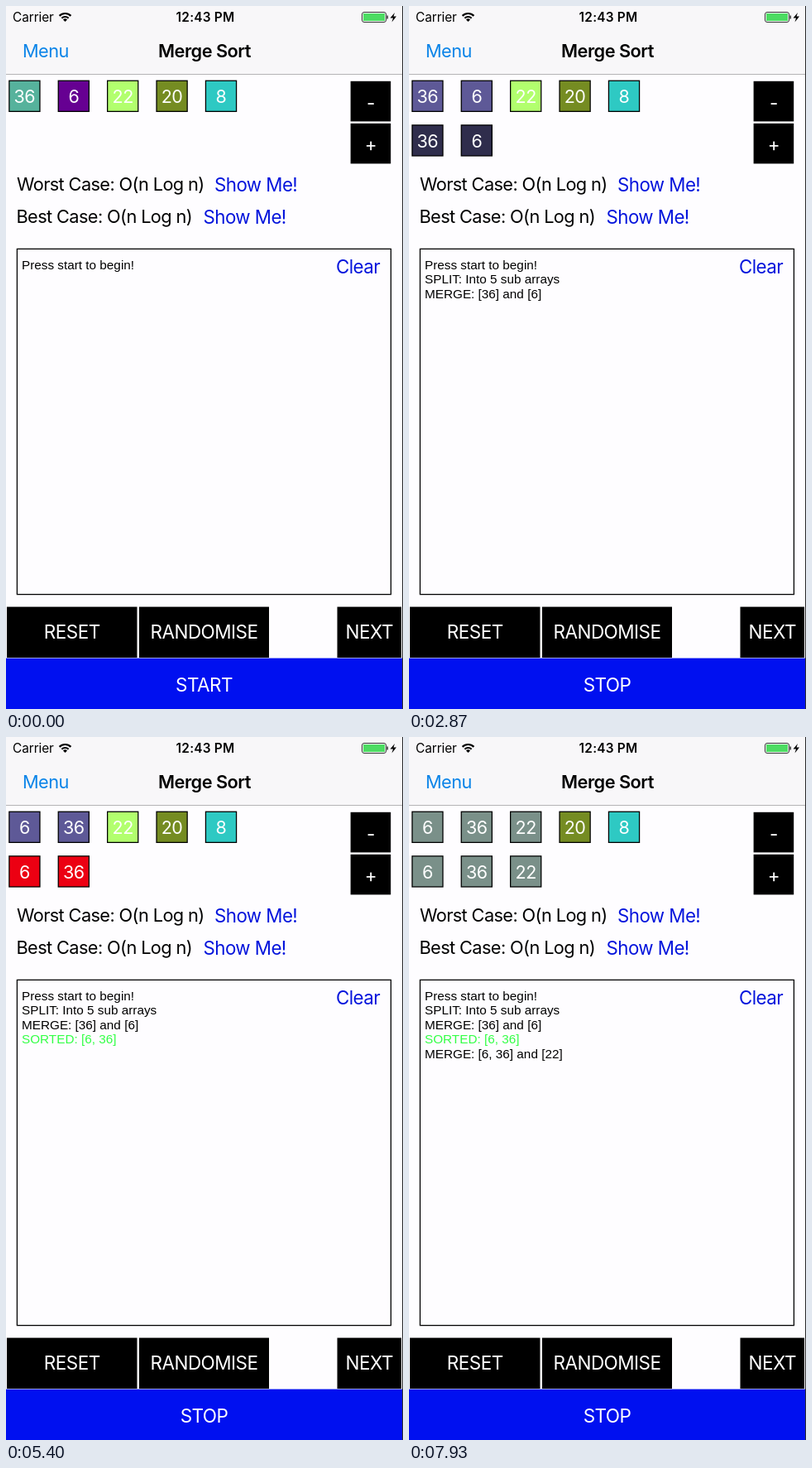
An HTML page with a canvas for the animation above (8000 ms loop, 480x849 px).

```html
<!DOCTYPE html>
<html lang="en">
<head>
<meta charset="utf-8">
<title>Merge Sort</title>
<style>
html, body { margin: 0; width: 100%; height: 100%; overflow: hidden; background: #fefdff; }
canvas { display: block; }
</style>
</head>
<body>
<canvas id="stage" width="480" height="849"></canvas>
<script>
const ctx = document.getElementById('stage').getContext('2d');
const LOOP = 8000, FADE = 300;
const UI = 'Inter, "Open Sans", sans-serif';
const LOG = '"Liberation Sans", Arial, sans-serif';
const BLUE = '#0010f0';
const LINK = { size: 22.3, color: '#0414dc' };
const LABEL = { track: -0.028 };

// Moments of the algorithm, in ms
const T = { start: 700, tint1: 1700, copy1: 2720, pick1: 3650, pick2: 4650,
            next: 5700, tint2: 6680, copy2: 7630 };

const BLACK = [0, 0, 0], RED = [236, 0, 18];
const COLORS = [[86, 178, 156], [102, 0, 146], [178, 255, 110], [117, 140, 34], [46, 201, 195]];
const mean = list => BLACK.map((_, i) => list.reduce((sum, c) => sum + c[i], 0) / list.length);
const PAIR = mean(COLORS.slice(0, 2));
const TRIPLE = mean(COLORS.slice(0, 3));

const LINES = [
  [0, 'Press start to begin!'],
  [T.start, 'SPLIT: Into 5 sub arrays'],
  [T.start, 'MERGE: [36] and [6]'],
  [T.pick2, 'SORTED: [6, 36]', '#33ff46'],
  [T.next, 'MERGE: [6, 36] and [22]']
];

function fade(from, to, t, at) {
  const p = Math.min(1, Math.max(0, (t - at) / FADE));
  const k = p * p * (3 - 2 * p);
  return from.map((v, i) => v + (to[i] - v) * k);
}

function rect(x, y, w, h, fill) {
  ctx.fillStyle = fill;
  ctx.fillRect(x, y, w, h);
}

function text(str, x, y, { size = 21.76, color = '#000', align = 'left', weight = 400, track = -0.024, family = UI } = {}) {
  ctx.font = `${weight} ${size}px ${family}`;
  ctx.letterSpacing = `${track * size}px`;
  ctx.textAlign = align;
  ctx.fillStyle = color;
  ctx.fillText(str, x, y);
}

function button(label, x, y, w, h, { fill = '#000', drop = 8 } = {}) {
  rect(x, y, w, h, fill);
  text(label, x + w / 2, y + h / 2 + drop, { size: 22.5, color: '#fff', align: 'center' });
}

function tile(value, col, row, color) {
  const x = 3.2 + col * 59.4, y = 89.6 + row * 53.6;
  rect(x, y, 38.4, 38.4, '#000');
  rect(x + 1.28, y + 1.28, 35.84, 35.84, `rgb(${color.map(Math.round)})`);
  text(value, x + 19.2, y + 27.4, { size: 21.5, color: '#fff', align: 'center' });
}

function statusBar() {
  text('Carrier', 8, 19, { size: 15.36, track: -0.005 });
  text('12:43 PM', 241, 19, { size: 15.36, weight: 600, align: 'center', track: 0.015 });

  ctx.strokeStyle = '#000';
  ctx.lineWidth = 2.2;
  for (const r of [5.8, 9.8]) {
    ctx.beginPath();
    ctx.arc(71.5, 18.8, r, -Math.PI * 0.75, -Math.PI * 0.25);
    ctx.stroke();
  }
  ctx.fillStyle = '#000';
  ctx.beginPath();
  ctx.moveTo(71.5, 19);
  ctx.arc(71.5, 19, 3.5, -Math.PI * 0.75, -Math.PI * 0.25);
  ctx.fill();

  ctx.lineWidth = 1;
  ctx.strokeStyle = '#333';
  ctx.beginPath();
  ctx.roundRect(430.5, 7.5, 29, 12, 2.5);
  ctx.stroke();
  rect(432, 9, 26, 9, '#4cdc62');
  rect(460.5, 11.5, 1.5, 4, '#333');

  ctx.fillStyle = '#000';
  ctx.beginPath();
  [[470, 8], [464.5, 14.5], [468, 14.5], [466.5, 19.5], [472, 12.5], [468.5, 12.5]]
    .forEach(([x, y]) => ctx.lineTo(x, y));
  ctx.fill();
}

function tiles(t) {
  const values = [t < T.pick1 ? 36 : 6, t < T.pick2 ? 6 : 36, 22, 20, 8];
  values.forEach((value, i) => {
    let color = COLORS[i];
    if (i < 2) color = fade(color, PAIR, t, T.tint1);
    if (i < 3) color = fade(color, TRIPLE, t, T.tint2);
    tile(value, i, 0, color);
  });

  if (t >= T.copy1 && t < T.next) {
    const base = fade(BLACK, PAIR, t, T.copy1);
    tile(t < T.pick2 ? 36 : 6, 0, 1, fade(base, RED, t, T.pick2));
    tile(t < T.pick1 ? 6 : 36, 1, 1, fade(base, RED, t, T.pick1));
  }
  if (t >= T.copy2) {
    [6, 36, 22].forEach((value, i) => tile(value, i, 1, fade(BLACK, TRIPLE, t, T.copy2)));
  }
}

function draw(t) {
  rect(0, 0, 480, 849, '#fefdff');
  rect(0, 0, 480, 82, '#f8f7f9');
  rect(0, 82, 480, 1, '#b4b3b5');
  statusBar();
  text('Menu', 20, 62, { color: '#0a84e8' });
  text('Merge Sort', 240, 62, { weight: 600, align: 'center' });

  tiles(t);
  button('-', 416.6, 90.8, 48.6, 48.6, { drop: 9.5 });
  button('+', 416.6, 141.8, 48.6, 48.6, { drop: 8.5 });

  text('Worst Case: O(n Log n)', 13, 223, LABEL);
  text('Show Me!', 252, 224, LINK);
  text('Best Case: O(n Log n)', 12.5, 262, LABEL);
  text('Show Me!', 238.5, 263, LINK);

  ctx.strokeStyle = '#000';
  ctx.lineWidth = 1.28;
  ctx.strokeRect(13.4, 293.4, 452, 417.2);
  LINES.forEach(([at, line, color], i) => {
    if (t >= at) text(line, 19, 317.5 + i * 17.5, { size: 15.3, track: 0, family: LOG, color });
  });
  text('Clear', 399, 323, LINK);

  button('RESET', 1, 725.6, 157.5, 61.4);
  button('RANDOMISE', 161, 725.6, 157, 61.4);
  button('NEXT', 400.5, 725.6, 77.5, 61.4);
  button(t < T.start ? 'START' : 'STOP', 0, 787.6, 479, 61.4, { fill: BLUE, drop: 9.7 });
  rect(479, 0, 1, 849, '#2a2a2c');
}

function tick() {
  draw(performance.now() % LOOP);
  requestAnimationFrame(tick);
}
tick();
</script>
</body>
</html>
```
